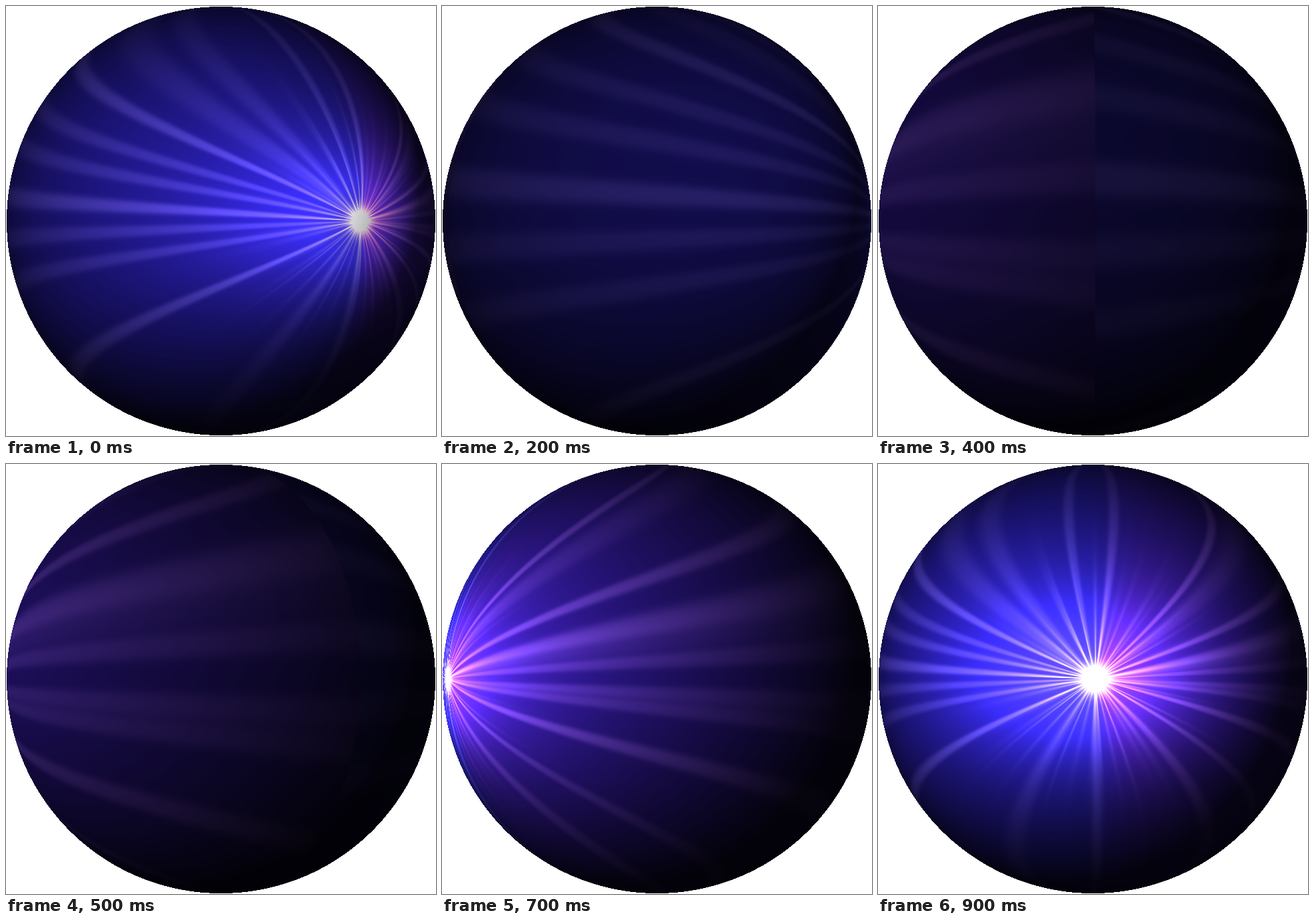
An HTML page with a canvas for the animation above (1000 ms loop, 647 by 647 pixels).

```html
<!DOCTYPE html>
<html lang="en">
<head>
<meta charset="utf-8">
<title>Spinning starburst sphere</title>
<style>
html, body { margin: 0; width: 100%; height: 100%; overflow: hidden; background: #fff; }
canvas { display: block; width: 100vw; height: 100vh; }
</style>
</head>
<body>
<canvas id="stage" width="647" height="647"></canvas>
<script>
const SIZE = 647, MID = 323.5, RADIUS = 322.5, EYE = 9;
const STEPS = 10, STEP_MS = 100, TURN = 360 / STEPS, DEG = 180 / Math.PI;
const LIGHT = [-0.45, 0.38, 0.81], AMBIENT = 0.31, DIFFUSE = 1.62, PEAK = 215;
const ctx = document.getElementById('stage').getContext('2d');

// Rays of one kind share a half width (degrees) and a strength
const KINDS = [
  { width: 1.5, power: 1.05, dirs: [20, 43.5, 155.7, 176.7, 203.3, 345.2] },
  { width: 1.4, power: .7, dirs: [3.4, 164, 169.8, 182.4, 188.3, 330, 354.4, 357.2] },
  { width: 2.4, power: .7, dirs: [11, 81.5, 101.5, 271, 315] },
  { width: 4, power: .45, dirs: [8.5, 35.5, 132, 144.5, 237] }
];

let seed = 11;
const rand = () => (seed = (seed * 16807) % 2147483647) / 2147483647;

const BINS = 20;
const longRays = new Float32Array(360 * BINS + 1);
const shortRays = new Float32Array(360 * BINS + 1);

function addRay(table, dir, width, power, sharp) {
  for (let i = 0; i < table.length; i++) {
    let d = Math.abs(i / BINS - dir);
    d = Math.min(d, 360 - d) / width;
    if (d < 4) table[i] += power * Math.exp(-Math.pow(d, sharp));
  }
}
for (const { width, power, dirs } of KINDS) {
  dirs.forEach(dir => addRay(longRays, dir, width, power, 3));
}
for (let i = 0; i < 40; i++) {
  addRay(shortRays, (i + rand() * .8) * 9, .8 + rand() * 1.4, .3 + rand() * .7, 2);
}

// Radial falloffs, tabulated per tenth of a degree
const FAR = 4000;
const falloff = f => Float32Array.from({ length: FAR }, (_, i) => f(i / 10));
const at = (table, r) => table[Math.min(FAR - 1, r * 10 | 0)];
const glow = falloff(r => 17 + 146 * Math.exp(-r / 65) + 70 * Math.exp(-r * r / 900));
const beam = falloff(r => 5 + 48 * Math.exp(-r / 60) + 110 * Math.exp(-r / 10));
const spark = falloff(r => 200 * Math.exp(-r / 8));
const halo = falloff(r => 70 * Math.exp(-r / 11));
const core = falloff(r => 300 * Math.exp(-r * r / 9));

// Perspective view of a unit sphere
const dots = [];
const slope = 1 / Math.sqrt(EYE * EYE - 1);
for (let py = 0; py < SIZE; py++) {
  for (let px = 0; px < SIZE; px++) {
    const x = (px + .5 - MID) / RADIUS, y = (MID - py - .5) / RADIUS;
    const q = x * x + y * y;
    if (q >= 1) continue;
    const t = (EYE - Math.sqrt(1 - q)) / (1 + slope * slope * q);
    const nx = x * slope * t, ny = y * slope * t, nz = EYE - t;
    const lit = nx * LIGHT[0] + ny * LIGHT[1] + nz * LIGHT[2];
    dots.push({
      index: (py * SIZE + px) * 4,
      lon: Math.atan2(nx, nz) * DEG,
      lat: Math.asin(ny) * DEG,
      light: AMBIENT + DIFFUSE * Math.max(0, lit)
    });
  }
}

function smooth(a, b, v) {
  const k = Math.max(0, Math.min(1, (v - a) / (b - a)));
  return k * k * (3 - 2 * k);
}

function render(starLon) {
  const image = ctx.createImageData(SIZE, SIZE), out = image.data.fill(255);
  for (const { index, lon, lat, light } of dots) {
    let dx = lon - starLon;
    dx -= 360 * Math.round(dx / 360);
    const dir = (Math.atan2(lat, dx) * DEG + 360) % 360;
    const bin = Math.round(dir * BINS);
    const near = Math.hypot(dx, lat), wide = Math.hypot(dx, lat * 1.7);
    const warm = smooth(-.1, .5, dx / (near + .01));
    const base = at(glow, wide);
    const ray = longRays[bin] * at(beam, wide);
    const h = at(halo, near);
    const white = shortRays[bin] * at(spark, near) + at(core, near);
    const red = base * (.23 + .06 * warm) + ray * (.88 + .15 * warm) + h * (.3 + .9 * warm) + white;
    const green = base * (.17 - .02 * warm) + ray * (.76 - .06 * warm) + h * .35 + white * .95;
    const blue = base * (1 - .08 * warm) + ray * 1.05 + h + white;
    [red, green, blue].forEach((v, i) => { out[index + i] = Math.min(PEAK, v) * light; });
  }
  return image;
}

const cache = [];
let shown = -1;
const start = performance.now();

function tick(now) {
  const step = Math.floor(Math.max(0, now - start) / STEP_MS) % STEPS;
  if (step !== shown) {
    cache[step] = cache[step] || render((step + 1) * TURN + .6);
    ctx.putImageData(cache[step], 0, 0);
    shown = step;
  }
  requestAnimationFrame(tick);
}
tick(start);
</script>
</body>
</html>
```
